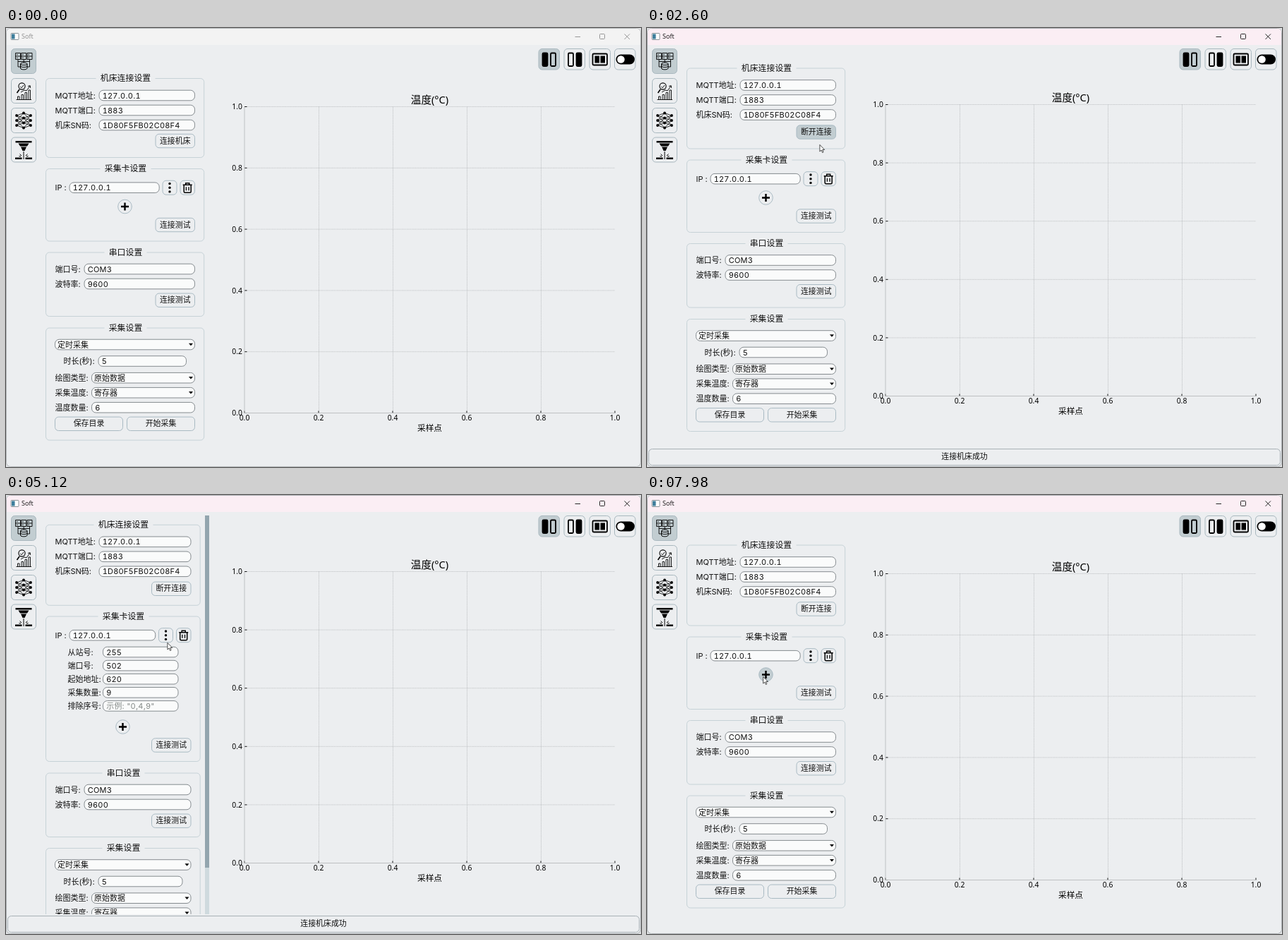
An HTML page that plays this animation: 900x622 px, repeating every 8000 ms.

```html
<!DOCTYPE html>
<html lang="zh-CN">
<head>
<meta charset="utf-8">
<title>Soft</title>
<style>
html, body { margin: 0; width: 100%; height: 100%; overflow: hidden; background: #dfe1e3; }
svg { display: block; width: 900px; height: 622px; }
text { font-family: Inter, "Noto Sans CJK SC", "Noto Sans CJK", sans-serif; fill: #111; white-space: pre; }
.plot text { font-family: "Noto Sans", "Noto Sans CJK SC", "Noto Sans CJK", sans-serif; fill: #000; }
.value { letter-spacing: .2px; }
.digits { font-variant-numeric: tabular-nums; }
.line { fill: none; stroke: #000; }
</style>
</head>
<body>
<svg id="stage" viewBox="0 0 900 622">
  <defs><clipPath id="view"><rect id="viewBox" x="50" y="24" width="240" height="597"/></clipPath></defs>
</svg>
<script>
const LOOP = 8000;
const BG = '#eceef0', HOVER = '#c2cdd1', FIELD = '#fafbfb', FIELD_HOVER = '#cdd6da';
const stage = document.getElementById('stage');

function add(parent, tag, attrs, text) {
  const node = document.createElementNS('http://www.w3.org/2000/svg', tag);
  for (const k in attrs) node.setAttribute(k, attrs[k]);
  if (text !== undefined) node.textContent = text;
  parent.appendChild(node);
  return node;
}
const box = (p, x, y, x2, y2, r, fill, stroke) =>
  add(p, 'rect', { x, y, width: x2 - x, height: y2 - y, rx: r, fill, stroke: stroke || 'none' });
const path = (p, d, width = 1) => add(p, 'path', { d, class: 'line', 'stroke-width': width });
const solid = (p, d) => add(p, 'path', { d });
const dot = (p, cx, cy, r) => add(p, 'circle', { cx, cy, r });

// Text centred vertically on y.
const label = (p, x, y, str, size = 11, anchor = 'start', more = {}) =>
  add(p, 'text', { x, y: y + size * .365, 'font-size': size, 'text-anchor': anchor, ...more }, str);

// Digits of equal width, other characters as they are.
function value(p, x, y, str) {
  const node = label(p, x, y, '', 11, 'start', { class: 'value' });
  for (const part of str.split(/(\d+)/).filter(Boolean)) {
    add(node, 'tspan', /\d/.test(part) ? { class: 'digits' } : {}, part);
  }
  return node;
}

/* Window frame */
const frame = box(stage, .5, .5, 899.5, 621.5, 6, BG, '#b4b7b9');
const TITLE = 'M1 24V6.5Q1 1 6.5 1H893.5Q899 1 899 6.5V24Z';
add(stage, 'path', { d: TITLE, fill: '#f3f3f3' });
const tint = add(stage, 'path', { d: TITLE, fill: '#fbeef4' });
box(stage, 7, 7.5, 18, 16.5, 1, '#fff', '#8b9499');
box(stage, 8, 8.5, 12.5, 15.5, 0, '#3f7f9c');
const caption = label(stage, 22, 12.2, 'Soft', 9, 'start', { style: 'font-family:"Open Sans",sans-serif' });
const controls = path(stage, 'M806.5 12.5H814M841.5 9.5Q841.5 8.5 842.5 8.5H847.5Q848.5 8.5 848.5 9.5V14.5Q848.5 15.5 847.5 15.5H842.5Q841.5 15.5 841.5 14.5ZM876.5 8.5L884 16M884 8.5L876.5 16', .9);

/* Tool buttons */
const tool = (x, y, size, on) => box(stage, x, y, x + size, y + size, 5, on ? HOVER : BG, '#a9b8bf');
[29.5, 71.5, 113.5, 155].forEach((y, i) => tool(7.5, y, 35, !i));
[755, 791, 827, 862.5].forEach((x, i) => tool(x, 29.5, 29.5, !i));

for (const x of [13.5, 21.7, 30]) {
  path(stage, `M${x} 35.5h7v9h-7zM${x} 40h7M${x + 1.5} 37.8h1.5M${x + 1.5} 42.3h1.5`, .9);
}
path(stage, 'M17 44.5V55H20.5M25.2 44.5V49M33.5 44.5V55H30M17 47.5H33.5', .9);
path(stage, 'M20.5 51V57C20.5 59.5 30 59.5 30 57V51C30 48.5 20.5 48.5 20.5 51C20.5 53 30 53 30 51M20.5 54C20.5 56 30 56 30 54');

path(stage, 'M16.5 101.5V97H19V101.5M22 101.5V94.5H24.5V101.5M27 101.5V91.5H29.5V101.5M32 101.5V88H34.5V101.5M14.5 101.5H36', .9);
path(stage, 'M15.5 92L19 87', 1.6);
path(stage, 'M21 91L26 88L29 89L34 82M31 82.5L34.2 81.7L34.6 85', .9);
add(stage, 'circle', { cx: 22.5, cy: 82.5, r: 4.6, class: 'line', 'stroke-width': 1.1 });
path(stage, 'M20.2 83L22 84.8L25 81', .9);

const layers = [[15, [124, 131, 138]], [25, [120.5, 127.5, 134.5, 141.5]], [35, [124, 131, 138]]];
layers.forEach(([x, ys], i) => ys.forEach(y => {
  dot(stage, x, y, 1.9);
  if (i < 2) for (const y2 of layers[i + 1][1]) if (Math.abs(y2 - y) < 11) path(stage, `M${x} ${y}L${layers[i + 1][0]} ${y2}`, .8);
}));

solid(stage, 'M13.5 160H36.5V162.5H13.5ZM17.5 163.5H32.5L30 167.5H20ZM21 168.5H29L26.5 174H23.5ZM13 183.5H22.5V186H13ZM27.5 183.5H37V186H27.5Z');
path(stage, 'M25 175V186M22 181L19.5 178.5M28 181L30.5 178.5M21 182L18.5 181.5M29 182L31.5 181.5', 1);

const pane = (x, y, x2, y2, fill) => add(stage, 'rect', {
  x, y, width: x2 - x, height: y2 - y, rx: 1.5, fill, stroke: '#000', 'stroke-width': 1.8
});
pane(760.5, 35.5, 767.5, 54, '#000');
pane(772, 35.5, 779, 54, 'none');
pane(797, 35.5, 804, 54, 'none');
pane(808.5, 35.5, 815.5, 54, '#000');
pane(831.5, 36.5, 852, 52.5, 'none');
solid(stage, 'M834.5 39.5H841V49.5H834.5ZM842.5 39.5H849V49.5H842.5Z');
box(stage, 864.5, 37.5, 891, 51.5, 7, '#000');
add(stage, 'circle', { cx: 871.5, cy: 44.5, r: 5.3, fill: '#fff' });

/* Plot */
function plot(top, bottom) {
  const g = add(stage, 'g', { class: 'plot' });
  label(g, 600.5, top - 10.2, '温度(°C)', 14.6, 'middle');
  for (let i = 0; i <= 5; i++) {
    const x = 338 + 105 * i, y = bottom - (bottom - top) * i / 5, str = (i / 5).toFixed(1);
    const grid = { class: 'line', style: 'stroke:#bfc2c4', 'stroke-width': .8, 'stroke-dasharray': '1.5 .8' };
    if (i) add(g, 'path', { d: `M338 ${y}H863`, ...grid });
    if (i && i < 5) add(g, 'path', { d: `M${x}.5 ${top}V${bottom}`, ...grid });
    path(g, `M338 ${y}h3.5M${x} ${bottom}v-3`, .9);
    label(g, 335, y, str, 10.4, 'end');
    label(g, x, bottom + 7, str, 10.4, 'middle');
  }
  add(g, 'path', { d: `M338 ${top}V${bottom}H863`, class: 'line', style: 'stroke:#b9bcbe', 'stroke-width': .9 });
  label(g, 600.5, bottom + 21, '采样点', 11.7, 'middle');
  return g;
}
const plotTall = plot(111.5, 545.5), plotShort = plot(108.5, 521.5);

/* Settings panel: group tops, height of the first group, connect caption */
function panel(tops, h1, connect, open) {
  const g = add(stage, 'g', { 'clip-path': 'url(#view)' });
  const right = open ? 262 : 267.5, mid = open ? 166.5 : 169.5;
  const spots = [];
  const widget = (x, y, x2, y2, r, kind) => {
    const field = kind === 'field' || kind === 'combo';
    const fill = field ? FIELD : BG;
    const node = box(g, x, y, x2, y2, r, fill, field ? '#858b8f' : '#a9bac3');
    spots.push({ x, y, x2, y2, node, fill, kind });
  };
  const group = (y, h, name) => {
    box(g, 56.5, y, right + 13.2, y + h, 5, 'none', '#c6d2d7');
    const half = name.length * 6 + 6;
    box(g, mid - half, y - 3, mid + half, y + 3, 0, BG);
    label(g, mid, y - .7, name, 11.9, 'middle');
  };
  const field = (x, x2, y, str, hint) => {
    widget(x, y - 7.3, x2, y + 7.3, 6, 'field');
    const node = value(g, x + 4.7, y, str);
    if (hint) node.style.fill = '#858a88';
  };
  const row = (x, name, from, to, y, str, hint) => {
    label(g, x, y, name);
    field(from, to, y, str, hint);
  };
  const combo = (x, y, str) => {
    widget(x, y - 7.3, right, y + 7.3, 6, 'combo');
    label(g, x + 3.5, y, str);
    solid(g, `M${right - 8.5} ${y - 1.8}h6l-3 3.6z`);
  };
  const button = (x, x2, y, str) => {
    widget(x, y - 9.7, x2, y + 9.7, 5, 'button');
    label(g, (x + x2) / 2, y - .3, str, 10.9, 'middle');
  };
  const [a, b, c, d] = tops, bx = right - 55.5;

  group(a, h1, '机床连接设置');
  row(69.5, 'MQTT地址:', 132, right, a + 24, '127.0.0.1');
  row(69.5, 'MQTT端口:', 132, right, a + 45, '1883');
  row(69.5, '机床SN码:', 132, right, a + 66, '1D80F5FB02C08F4');
  button(bx, right, a + h1 - 23.5, connect);

  const h2 = open ? 205.5 : 102.5, ip = b + 26.7;
  group(b, h2, '采集卡设置');
  row(69.5, 'IP :', 90, right - 50.3, ip, '127.0.0.1');
  widget(right - 45.5, ip - 10, right - 25.5, ip + 10, 5, 'button');
  for (const k of [-5.7, 0, 5.7]) dot(g, right - 35.5, ip + k, 1.7);
  widget(right - 20.5, ip - 10, right, ip + 10, 5, 'button');
  const tx = right - 10.3;
  path(g, `M${tx - 6.5} ${ip - 4}h13M${tx - 2.5} ${ip - 4.5}v-2h5v2M${tx - 5} ${ip - 4}v9.5q0 1.5 1.5 1.5h7q1.5 0 1.5 -1.5v-9.5`, 1.5);
  path(g, `M${tx - 1.8} ${ip - 1}v5M${tx + 1.8} ${ip - 1}v5`, 1.3);
  if (open) {
    [['从站号:', '255'], ['端口号:', '502'], ['起始地址:', '620'], ['采集数量:', '9'], ['排除序号:', '示例: "0,4,9"']]
      .forEach(([name, str], i) => row(87.5, name, 137.5, 244, b + 50.5 + 19.1 * i, str, i === 4));
  }
  const py = b + h2 - 49, px = mid - 1;
  widget(px - 9.8, py - 9.8, px + 9.8, py + 9.8, 9.8, 'button');
  path(g, `M${px - 5.5} ${py}h11M${px} ${py - 5.5}v11`, 2.4);
  button(bx, right, b + h2 - 23, '连接测试');

  group(c, 90.5, '串口设置');
  row(69.5, '端口号:', 111, right, c + 23.5, 'COM3');
  row(69.5, '波特率:', 111, right, c + 44.5, '9600');
  button(bx, right, c + 67.7, '连接测试');

  group(d, 159, '采集设置');
  combo(69.5, d + 23.5, '定时采集');
  row(81.5, '时长(秒):', 131, right - 12, d + 47, '5');
  label(g, 69.5, d + 70.7, '绘图类型:');
  combo(121.5, d + 70.7, '原始数据');
  label(g, 69.5, d + 91.7, '采集温度:');
  combo(121.5, d + 91.7, '寄存器');
  row(69.5, '温度数量:', 121.5, right, d + 112.7, '6');
  button(69.5, right - 102, d + 135.8, '保存目录');
  button(right - 96, right, d + 135.8, '开始采集');
  return { g, spots };
}
const panels = [
  { until: 2600, ...panel([71.5, 199.5, 318, 425], 112, '连接机床') },
  { until: 5090, ...panel([57, 187, 305.5, 412.5], 114, '断开连接') },
  { until: 7120, ...panel([42.3, 172, 394, 500.5], 114, '断开连接', true) },
  { until: LOOP, ...panel([71, 201, 319.5, 426], 114, '断开连接') }
];

const scroll = add(stage, 'g');
const track = box(scroll, 282, 29, 288, 594, 0, '#cfdade');
const thumb = box(scroll, 282, 29, 288, 528, 0, '#93a5ae');

const status = add(stage, 'g');
box(status, 2.5, 596.5, 897.5, 619.5, 5, BG, '#a8b1b6');
label(status, 450, 607.3, '连接机床成功', 10.9, 'middle');

/* Pointer */
const arrow = add(stage, 'path', {
  d: 'M.4 .4V10L2.6 8L4.1 11.5L5.6 10.8L4.2 7.5H7.2Z', fill: '#fff', stroke: '#222', 'stroke-width': .8
});
const beam = path(stage, 'M-2 -5H-.5L0 -4.5L.5 -5H2M0 -4.5V4.5M-2 5H-.5L0 4.5L.5 5H2', .9);

// time, x, y
const moves = [
  [360, 501, 540], [430, 400, 446], [640, 400, 446], [1190, 282, 225], [1390, 282, 225], [1430, 289, 222],
  [1740, 242, 167], [2180, 242, 167], [2330, 244.5, 165], [3670, 244.5, 165], [3920, 266, 258],
  [4120, 266, 258], [4150, 268.5, 257], [4310, 268.5, 257], [4320, 268.5, 256], [4520, 268.5, 256],
  [4900, 228.5, 209], [5780, 228.5, 209], [6080, 202.5, 280], [6210, 195, 311], [6370, 195, 311],
  [6660, 229, 198], [7490, 229, 198], [7620, 226, 225], [7980, 164.3, 257]
];
function pointer(t) {
  const i = moves.findIndex(m => m[0] > t);
  if (i < 1) return moves[i ? moves.length - 1 : 0].slice(1);
  const [t0, x0, y0] = moves[i - 1], [t1, x1, y1] = moves[i];
  const k = (t - t0) / (t1 - t0), e = k * k * (3 - 2 * k);
  return [x0 + (x1 - x0) * e, y0 + (y1 - y0) * e];
}

const show = (node, on) => node.setAttribute('visibility', on ? 'visible' : 'hidden');

function render(t) {
  const active = Math.min(1, Math.max(0, (t - 2490) / 90));
  const ink = active ? '#111' : '#8d8d8d';
  tint.setAttribute('opacity', active);
  caption.style.fill = controls.style.stroke = ink;
  frame.setAttribute('stroke', active ? '#a9adb0' : '#b4b7b9');

  const message = t >= 2600 && t < 5600;
  show(status, message);
  show(plotShort, message);
  show(plotTall, !message);

  const now = panels.find(p => t < p.until);
  for (const p of panels) show(p.g, p === now);
  show(scroll, now === panels[2]);
  const end = message ? 594 : 621;
  document.getElementById('viewBox').setAttribute('height', end - 24);
  track.setAttribute('height', end - 29);
  thumb.setAttribute('height', message ? 499 : 549);

  const [x, y] = pointer(t);
  // The connect button stays lit until the pointer moves again.
  const held = t >= 2600 && t < 3715;
  const hx = held ? 240 : x, hy = held ? 147 : y;
  let over = null;
  for (const s of now.spots) {
    const hit = t >= 360 && hx >= s.x && hx <= s.x2 && hy >= s.y && hy <= s.y2;
    if (hit) over = s.kind;
    s.node.setAttribute('fill', !hit ? s.fill : s.kind === 'button' ? HOVER : FIELD_HOVER);
  }
  show(arrow, t >= 360 && over !== 'field');
  show(beam, over === 'field');
  arrow.setAttribute('transform', `translate(${x} ${y})`);
  beam.setAttribute('transform', `translate(${x} ${y})`);
}

const start = performance.now();
function tick() {
  render((performance.now() - start) % LOOP);
  requestAnimationFrame(tick);
}
tick();
</script>
</body>
</html>
```
